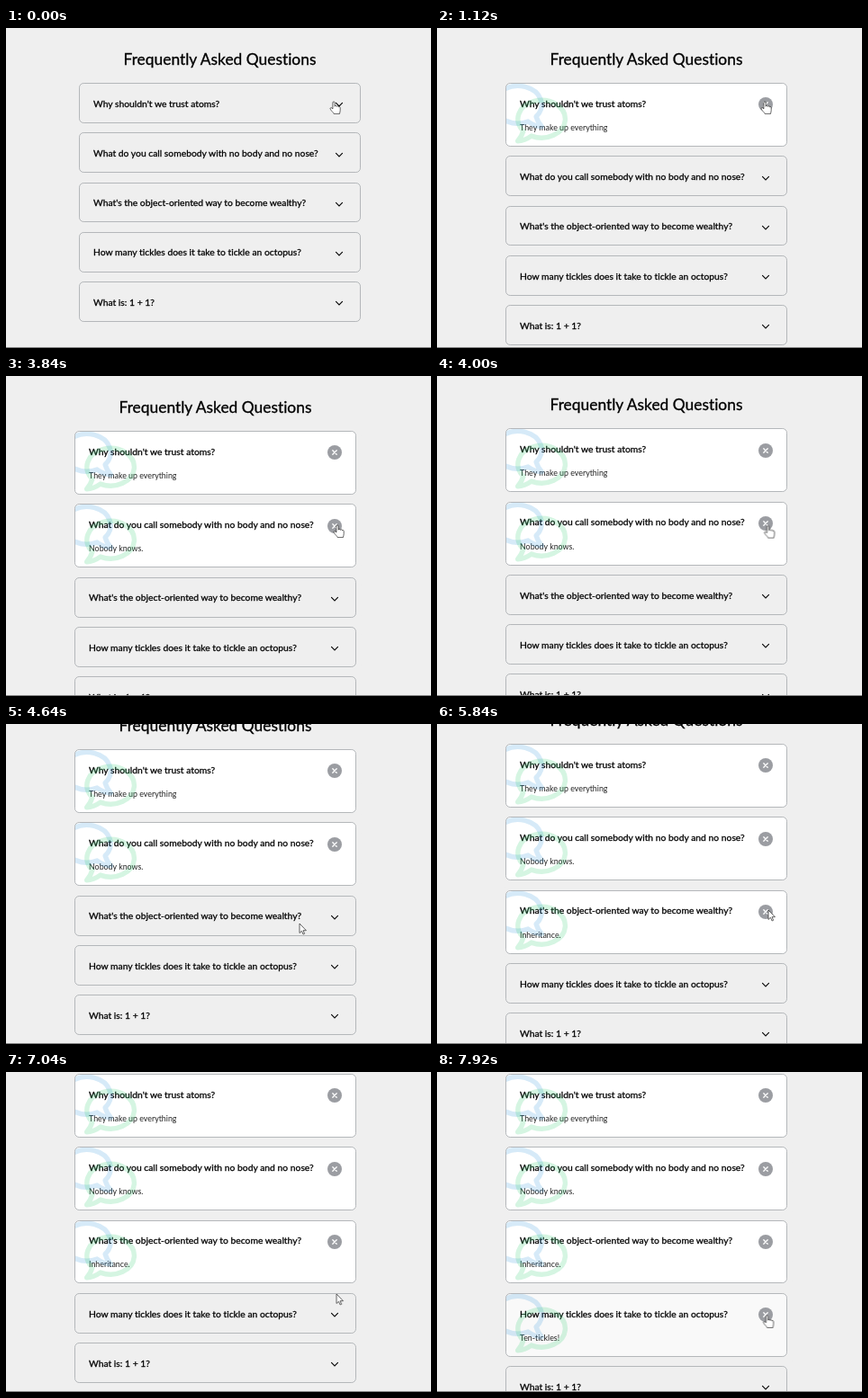
An HTML page for the animation above (8000 ms loop, 472 by 356 pixels).

```html
<!DOCTYPE html>
<html lang="en">
<head>
<meta charset="utf-8">
<title>Frequently Asked Questions</title>
<style>
@property --open { syntax: "<number>"; inherits: true; initial-value: 0; }
@property --fade { syntax: "<number>"; inherits: true; initial-value: 0; }

html, body { margin: 0; width: 100%; height: 100%; overflow: hidden; background: #efefef; }
body {
  position: relative; color: #000;
  font-family: Lato, "Open Sans", sans-serif; font-weight: 400; font-variant-ligatures: none;
}

.page {
  position: absolute; left: 81px; top: 0; width: 313px; height: 420px;
  animation: shift 8s linear infinite, scroll 8s linear infinite;
}
h1 {
  position: absolute; left: 0; top: 22.8px; width: 100%; margin: 0;
  font-size: 17.4px; font-weight: 400; line-height: 24px;
  text-align: center; white-space: nowrap; -webkit-text-stroke: .3px #000;
}
.list { position: absolute; left: 0; top: 61.2px; width: 100%; }
.card {
  position: relative; box-sizing: border-box; overflow: hidden;
  height: calc(44.8px + 26.1px * var(--open)); margin-bottom: 10.4px;
  border: 1px solid #b4b7ba; border-radius: 5.2px;
  background: rgb(255 255 255 / var(--fade));
  animation: 8s linear infinite;
}
.card:nth-child(1) { animation-name: open1; }
.card:nth-child(2) { animation-name: open2; }
.card:nth-child(3) { animation-name: open3; }
.card:nth-child(4) { animation-name: open4; }
.card p { position: absolute; left: 15px; margin: 0; line-height: 18px; white-space: nowrap; }
.card .q { top: 12.7px; font-size: 10.33px; -webkit-text-stroke: .28px #000; }
.card .a { top: 39.9px; font-size: 8.85px; color: #222; opacity: var(--open); }
.card svg { position: absolute; overflow: visible; }
.bubble { width: 58px; height: 58px; opacity: calc(.2 * var(--open)); }
.blue { left: -16px; top: -4px; color: #3498db; transform: scaleX(-1); }
.green { left: 10px; top: 11.6px; color: #2ecc71; }
.icon { left: 280px; top: 15.3px; width: 16px; height: 16px; fill: none; stroke-linecap: round; }
.down { opacity: calc(1 - var(--open)); stroke: #000; stroke-width: 1.1; }
.close { opacity: var(--open); stroke: #fff; stroke-width: 1.3; }

.floor { position: absolute; left: 0; bottom: 0; width: 100%; height: 1px; background: #858585; }

.cursor {
  position: absolute; left: 0; top: 0; width: 1px; height: 1px; overflow: visible;
  fill: #fff; stroke: #222; stroke-width: .7; stroke-linejoin: round;
  animation: move 8s ease-in-out infinite;
}
.hand { animation: hand 8s step-end infinite; }
.arrow { animation: arrow 8s step-end infinite; }

@keyframes open1 {
  0%, 5.99% { --open: 0; --fade: 0; }
  6% { --open: 1; --fade: 0; }
  9%, 100% { --open: 1; --fade: 1; }
}
@keyframes open2 {
  0%, 40.99% { --open: 0; --fade: 0; }
  41% { --open: 1; --fade: 0; }
  44%, 100% { --open: 1; --fade: 1; }
}
@keyframes open3 {
  0%, 68.99% { --open: 0; --fade: 0; }
  69% { --open: 1; --fade: 0; }
  72%, 100% { --open: 1; --fade: 1; }
}
@keyframes open4 {
  0%, 96.99% { --open: 0; --fade: 0; }
  97% { --open: 1; --fade: 0; }
  100% { --open: 1; --fade: 1; }
}
/* the scrollbar appears and narrows the page */
@keyframes shift {
  0%, 5.99% { left: 81px; }
  6%, 100% { left: 76px; }
}
@keyframes scroll {
  0%, 49% { top: 0; animation-timing-function: ease-in-out; }
  54%, 71.5% { top: -33px; animation-timing-function: ease-in-out; }
  76%, 78% { top: -58.6px; }
  80%, 100% { top: -59.2px; }
}
@keyframes move {
  0%, 22% { transform: translate(364px, 82px); }
  27% { transform: translate(379px, 112px); }
  33% { transform: translate(365px, 168px); }
  36% { transform: translate(363px, 171px); }
  39.5%, 49.5% { transform: translate(368px, 166px); }
  56.5%, 58.5% { transform: translate(326px, 222px); }
  65.5% { transform: translate(354px, 211px); }
  68.5%, 84% { transform: translate(368px, 207px); }
  91%, 100% { transform: translate(366.5px, 271px); }
}
@keyframes hand {
  0% { opacity: 1; }
  24% { opacity: 0; }
  32% { opacity: 1; }
  51% { opacity: 0; }
  68% { opacity: 1; }
  73% { opacity: 0; }
  90%, 100% { opacity: 1; }
}
@keyframes arrow {
  0% { opacity: 0; }
  24% { opacity: 1; }
  32% { opacity: 0; }
  51% { opacity: 1; }
  68% { opacity: 0; }
  73% { opacity: 1; }
  90%, 100% { opacity: 0; }
}
</style>
</head>
<body>
<div class="page">
  <h1>Frequently Asked Questions</h1>
  <div class="list"></div>
</div>
<div class="floor"></div>
<svg class="cursor">
  <path class="hand" d="M-1.1 .9C-1.1 -.4 1.1 -.4 1.1 .9V5.2C1.3 4 3.4 4.1 3.4 5.4C3.7 4.4 5.6 4.6 5.6 5.9C6 5.2 7.2 5.4 7.2 6.8V9.6C7.2 11.4 6.6 12 6.4 13.6H.2C0 12.2 -2 11 -3 9.4C-3.8 8.2 -4.3 7.4 -3.6 6.9C-2.8 6.3 -1.8 7 -1.1 8Z"/>
  <path class="arrow" d="M0 0V10.5L2.4 8.3 4.1 12 5.6 11.3 4 7.7H7.4Z"/>
</svg>
<script>
const faqs = [
  ["Why shouldn't we trust atoms?", "They make up everything"],
  ["What do you call somebody with no body and no nose?", "Nobody knows."],
  ["What's the object-oriented way to become wealthy?", "Inheritance."],
  ["How many tickles does it take to tickle an octopus?", "Ten-tickles!"],
  ["What is: 1 + 1?", ""]
];

const bubble = color => `<svg class="bubble ${color}" viewBox="0 0 512 512">
  <path fill="none" stroke="currentColor" stroke-width="48" stroke-linejoin="round"
    d="M157 407C95 452 45 456 24 456C24 456 58 420 78 358A232 184 0 1 1 157 407Z"/></svg>`;

const icon = (name, shape) => `<svg class="icon ${name}" viewBox="-8 -8 16 16">${shape}</svg>`;

document.querySelector(".list").innerHTML = faqs.map(([q, a]) => `<div class="card">
  <p class="q">${q}</p><p class="a">${a}</p>
  ${bubble("blue")}${bubble("green")}
  ${icon("down", '<path d="M-3.5 -1.7L0 1.9L3.5 -1.7"/>')}
  ${icon("close", '<circle r="8" fill="#9b9da2" stroke="none"/><path d="M-2.2 -2.2L2.2 2.2M2.2 -2.2L-2.2 2.2"/>')}
</div>`).join("");
</script>
</body>
</html>
```
